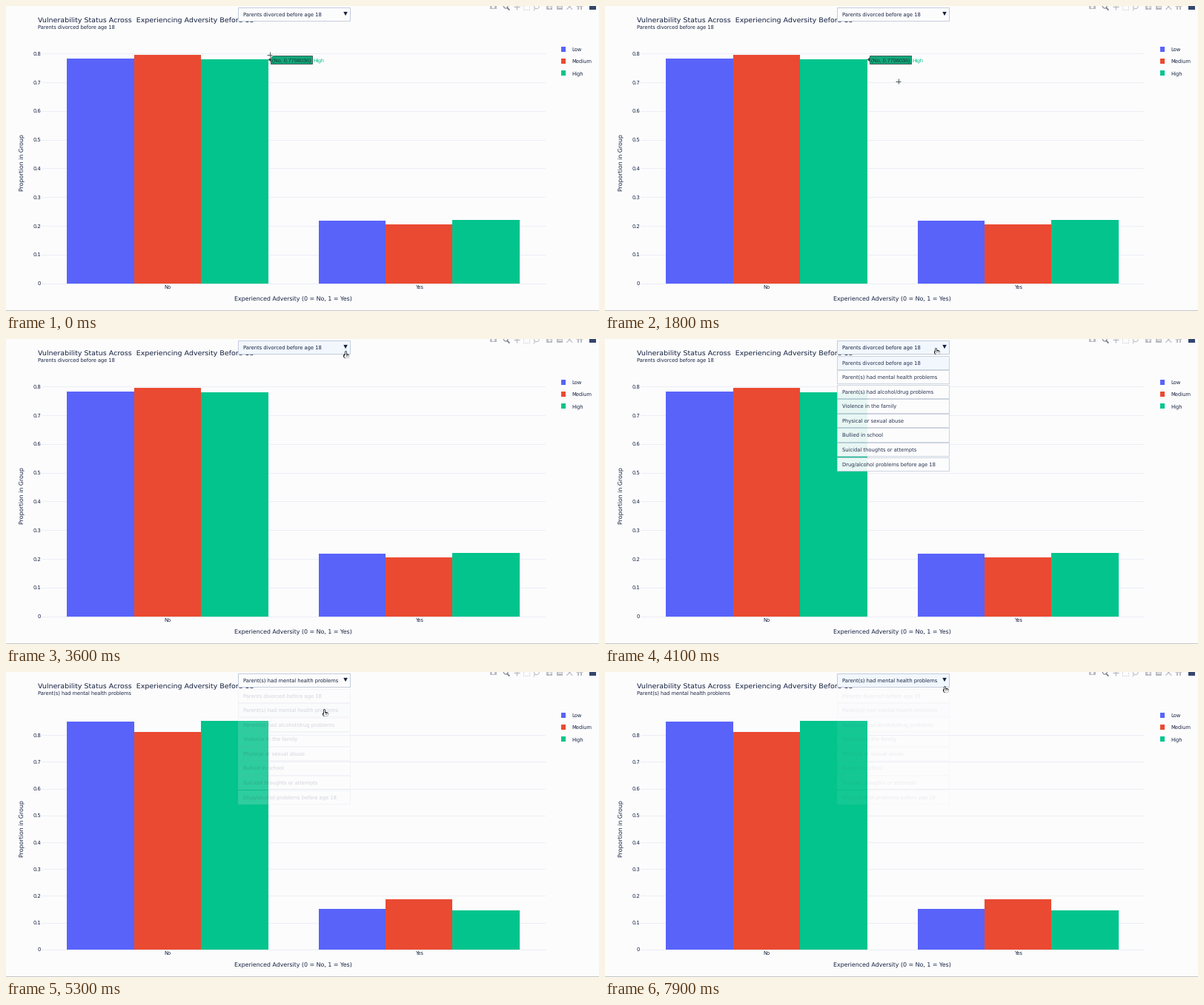
Animation, 800 px wide and 412 px high, one loop 8 s. Source, as a matplotlib script:

```python
import numpy as np
import matplotlib.pyplot as plt
from matplotlib.animation import FuncAnimation
from matplotlib.patches import Circle, Polygon, Rectangle

W, H, DPI = 800, 412, 100
INTERVAL, FRAMES = 100, 80
PT = 72 / DPI
NUDGE = 0.7  # pixel-centre offset of the whole picture

INK, GRID, PAPER = "#14203f", "#ebeef5", "#fcfcfd"
BORDER, ACTIVE = "#c4ccda", "#f1f7fd"
SERIES = {"Low": "#5963fa", "Medium": "#ea4a32", "High": "#02c48c"}

# Chart geometry: two groups share the plot width, bars fill 80 % of a group
LEFT, RIGHT, TOP, BASE = 49, 728, 50.6, 375.4
GROUP_W = 339.3
BAR = 0.8 * GROUP_W / 3

OPTIONS = [
    "Parents divorced before age 18",
    "Parent(s) had mental health problems",
    "Parent(s) had alcohol/drug problems",
    "Violence in the family",
    "Physical or sexual abuse",
    "Bullied in school",
    "Suicidal thoughts or attempts",
    "Drug/alcohol problems before age 18",
]
# Share answering "No" per series; "Yes" is the complement
SHARES = [(0.782, 0.795, 0.7798), (0.8495, 0.813, 0.853)]

MENU_X, MENU_Y, MENU_W, ROW_H, ROW_STEP = 313.7, 2.5, 151, 18.2, 19.55
TITLE_PX, TEXT_PX, AXIS_PX = 9.5, 6.72, 7.85

# Timeline in ms
OPEN, CLOSE, REOPEN, FADE = 3975, 5190, 7875, 150
SELECT_AT, HOVER_END = 5300, 1800
START = (356.5, 66.5)
MOVES = [  # start, end, x, y
    (0, 1100, 294.5, 185.5), (1400, 2200, 498, 19), (2600, 3300, 522, 44),
    (3300, 3700, 446.5, 12.5), (4200, 4800, 430, 51),
    (6000, 6400, 490.5, 49.5), (7000, 7700, 458.5, 19.5),
]

plt.rcParams.update({"font.family": "DejaVu Sans", "text.hinting": "none"})
fig = plt.figure(figsize=(W / DPI, H / DPI), dpi=DPI, facecolor=PAPER)
ax = fig.add_axes([0, 0, 1, 1])


def ease(u):
    u = np.clip(u, 0, 1)
    return u * u * (3 - 2 * u)


# All artists share one zorder, so they paint in the order they are drawn.
def label(x, y, text, size=TEXT_PX, color=INK, **kw):
    """Text whose capitals are centred on y."""
    ax.text(x, y + 0.365 * size, text, fontsize=size * PT, color=color,
            va="baseline", zorder=2, **kw)


def box(x, y, w, h, fill, edge="none", lw=0.0, **kw):
    ax.add_patch(Rectangle((x, y), w, h, fc=fill, ec=edge, lw=lw * PT, zorder=2, **kw))


def line(xs, ys, color, lw=1.0, **kw):
    ax.plot(xs, ys, color=color, lw=lw * PT, zorder=2, **kw)


def polygon(points, fill, edge="none", lw=0.0):
    ax.add_patch(Polygon(points, fc=fill, ec=edge, lw=lw * PT, zorder=2))


def plus(x, y, r, color, lw):
    line([x - r, x + r], [y, y], color, lw, solid_capstyle="butt")
    line([x, x], [y - r, y + r], color, lw, solid_capstyle="butt")


def pointer_at(t):
    pos = np.array(START)
    for start, end, *goal in MOVES:
        pos = pos + (np.array(goal) - pos) * ease((t - start) / (end - start))
    return pos


def menu_opacity(t):
    rise = [ease((t - start) / FADE) for start in (OPEN, CLOSE, REOPEN)]
    return rise[0] - rise[1] + rise[2]


def draw_chart(shares):
    # The tallest bar takes 95 % of the plot height
    unit = 0.95 * (BASE - TOP) / max(shares)
    for tick in range(9):
        y = BASE - unit * tick / 10
        line([LEFT, RIGHT], [y, y], GRID)
        label(48, y, f"{tick / 10:.1f}" if tick else "0", ha="right")
    for g, group in enumerate(("No", "Yes")):
        center = LEFT + GROUP_W * (g + 0.5)
        label(center, 380.4, group, ha="center")
        for i, (share, color) in enumerate(zip(shares, SERIES.values())):
            height = unit * (1 - share if g else share)
            x = center + BAR * (i - 1.5)
            box(x, BASE - height, BAR, height, color)
            line([x + BAR] * 2, [BASE - height, BASE], "#e5ecf6", 0.6, ls=":")
    label(388, 395, "Experienced Adversity (0 = No, 1 = Yes)", AXIS_PX, ha="center")
    ax.text(24.2, 212.7, "Proportion in Group", fontsize=AXIS_PX * PT, color=INK,
            rotation=90, rotation_mode="anchor", ha="center", va="baseline")
    for i, (name, color) in enumerate(SERIES.items()):
        y = 59 + 16.2 * i
        box(749.4, y - 3.3, 6.7, 6.7, color)
        label(763.6, y, name)


def draw_toolbar():
    gray, dark, y = "#b9bcc2", "#747b88", 1.5
    box(653.5, y - 3, 9, 6.5, gray)
    ax.add_patch(Circle((658, y + 0.5), 1.9, fc=PAPER, ec="none", zorder=2))
    ax.add_patch(Circle((675, y - 0.5), 2.8, fc="none", ec=dark, lw=PT, zorder=2))
    line([677, 679.5], [y + 1.7, y + 4.2], dark, 1.7)
    plus(689.5, y, 4, gray, 1.3)
    box(699, y - 4, 8, 8, "none", gray, 1, ls=":")
    ax.add_patch(Circle((716.5, y - 0.5), 3.4, fc="none", ec=gray, lw=PT, zorder=2))
    line([714, 713], [y + 2, y + 5], gray)
    for x in (733.5, 747.5):
        box(x - 4, y - 4, 8, 8, gray)
        line([x - 2.3, x + 2.3], [y, y], PAPER, 1.2)
    line([733.5] * 2, [y - 2.3, y + 2.3], PAPER, 1.2)
    for side in (-1, 1):
        line([757.5, 764.5], [y - 3.5 * side, y + 3.5 * side], gray, 1.2)
    polygon([(769.5, y), (774.5, y - 4), (779.5, y)], gray)
    for x in (771.5, 775.2):
        box(x, y, 2.2, 4, gray)
    box(787.5, y - 4, 9, 8.6, "#34466c")


def draw_hover():
    edge, fill, y = "#33463f", "#12a87b", 73.1
    polygon([(354.5, y), (357.8, y - 3), (357.8, y + 3)], edge)
    box(357.8, y - 5.6, 56, 11.2, fill, edge, 0.8)
    label(359.8, y, "(No, 0.7798036)", 7.28, "#15352b", family="Liberation Sans")
    label(415.5, y, "High", 7.28, SERIES["High"], family="Liberation Sans")


def draw_menu(selected, hovered, alpha):
    box(MENU_X, MENU_Y, MENU_W, ROW_H, ACTIVE if hovered else PAPER, BORDER, 1)
    label(320.4, 11.5, OPTIONS[selected])
    polygon([(456, 8.6), (461.5, 8.6), (458.75, 13.8)], INK)
    if alpha <= 0:
        return
    for i, text in enumerate(OPTIONS):
        y = 23.4 + ROW_STEP * i
        fill = ACTIVE if i == selected else PAPER
        box(MENU_X, y, MENU_W, ROW_H, fill, BORDER, 0.9, alpha=alpha)
        label(320.4, y + 9.1, text, alpha=alpha)


def draw_cross(x, y):
    plus(x, y, 4.2, "white", 2.6)
    plus(x, y, 3.6, "#4c5a57", 1.0)


def draw_arrow(x, y):
    line([x + 2, x + 3.6], [y + 5, y + 8.4], "black", 1.4)
    polygon([(x, y), (x, y + 7.4), (x + 5.2, y + 5.2)], "black", "white", 0.3)


def draw_hand(x, y):
    """A dark silhouette with a slightly thinner white one on top."""
    for color, rim in (("#15171c", 1.5), ("white", 0)):
        line([x, x], [y + 0.7, y + 5], color, 1.3 + rim, solid_capstyle="round")
        line([x + 0.9, x + 2.8], [y + 6.2, y + 6.2], color, 4.6 + rim,
             solid_capstyle="round")
    for dx in (1.3, 2.9):
        line([x + dx] * 2, [y + 4.5, y + 6.5], "#15171c", 0.5)


def draw(frame):
    t = frame * INTERVAL
    selected = int(t >= SELECT_AT)
    x, y = pointer_at(t)
    alpha = menu_opacity(t)
    in_column = MENU_X <= x <= MENU_X + MENU_W
    on_head = in_column and MENU_Y <= y <= MENU_Y + ROW_H
    on_list = in_column and alpha > 0 and y < 180

    ax.clear()
    ax.set(xlim=(NUDGE, W + NUDGE), ylim=(H + NUDGE, NUDGE))
    ax.axis("off")
    draw_chart(SHARES[selected])
    label(43.8, 19.7, "Vulnerability Status Across  Experiencing Adversity Before 18",
          TITLE_PX)
    label(43.8, 28.8, OPTIONS[selected], 0.7 * TITLE_PX)
    line([0, W + 1], [412.2] * 2, "#c4c6ca")
    draw_toolbar()
    if t <= HOVER_END:
        draw_hover()
    draw_menu(selected, on_head, alpha)
    if on_head or on_list:
        draw_hand(x, y)
    elif y > TOP + 1:
        draw_cross(x, y)
    else:
        draw_arrow(x, y)
    return []


anim = FuncAnimation(fig, draw, frames=FRAMES, interval=INTERVAL,
                     repeat=True, repeat_delay=0, init_func=lambda: [])
plt.show()
```
